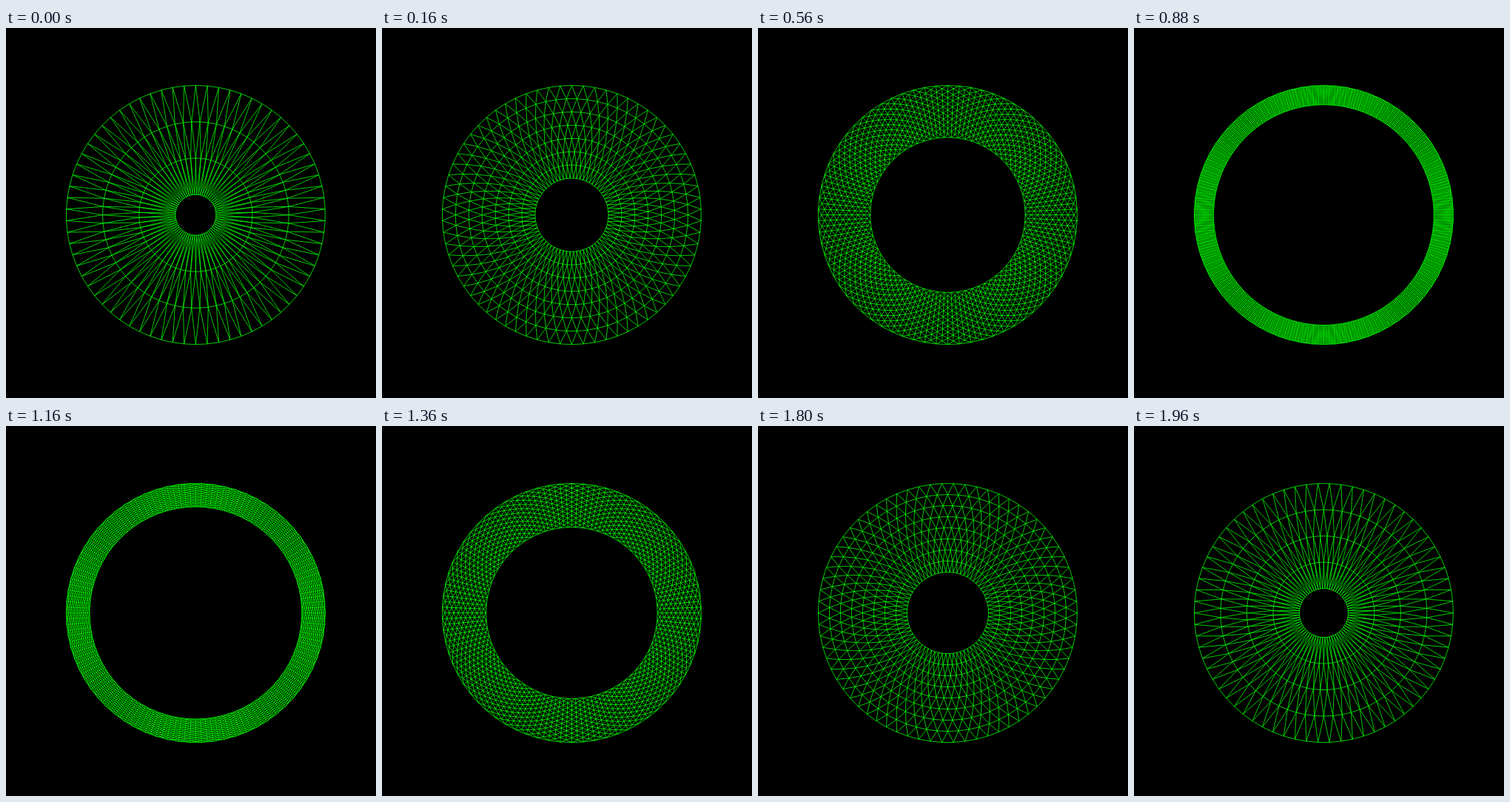
These frames come from a looping animation (500 px wide and 500 px high, 2 s). An HTML page with a canvas:

```html
<!DOCTYPE html>
<html lang="en">
<head>
<meta charset="utf-8">
<title>Triangle mesh ring</title>
<style>
  html, body { margin: 0; width: 100%; height: 100%; overflow: hidden; background: #000; }
  canvas { display: block; }
</style>
</head>
<body>
<canvas id="stage" width="500" height="500"></canvas>
<script>
const ctx = document.getElementById('stage').getContext('2d');
const CX = 256.4, CY = 252.6, OUTER = 175;
const SIDES = 70, STEP_MS = 40, STEPS = 50;

function draw(step) {
  // Band count climbs from 3 to 28 and back, one per step.
  const bands = 3 + Math.min(step, STEPS - step);
  const inner = 10.9 + 5.523 * bands;
  const height = (OUTER - inner) / bands;
  const radius = ring => inner + height * ring;

  // Neighbouring rings are turned by half a side.
  const point = (ring, side) => {
    const r = radius(ring);
    const a = (side + (ring + 1) / 2) * 2 * Math.PI / SIDES;
    return [CX + r * Math.sin(a), CY - r * Math.cos(a)];
  };

  // Strokes one edge per side, all in a single path.
  const edges = (ringA, shiftA, ringB, shiftB) => {
    ctx.beginPath();
    for (let side = 0; side < SIDES; side++) {
      ctx.moveTo(...point(ringA, side + shiftA));
      ctx.lineTo(...point(ringB, side + shiftB));
    }
    ctx.stroke();
  };

  ctx.fillStyle = '#000';
  ctx.fillRect(0, 0, 500, 500);
  ctx.strokeStyle = '#0f0';
  ctx.lineWidth = 0.8;

  for (let ring = 0; ring <= bands; ring++) {
    // Delaunay rule: long inner chords give way to radial edges.
    const border = ring === 0 || ring === bands;
    const halfChord = radius(ring) * Math.sin(Math.PI / SIDES);
    if (border || height > halfChord) edges(ring, 0, ring, 1);
    else edges(ring - 1, 1, ring + 1, 0);

    if (ring < bands) {
      edges(ring, 0, ring + 1, 0);
      edges(ring, 0, ring + 1, -1);
    }
  }
}

let shown = -1;
const start = performance.now();
function tick() {
  const step = Math.floor((performance.now() - start) / STEP_MS) % STEPS;
  if (step !== shown) draw(shown = step);
  requestAnimationFrame(tick);
}
tick();
</script>
</body>
</html>
```
